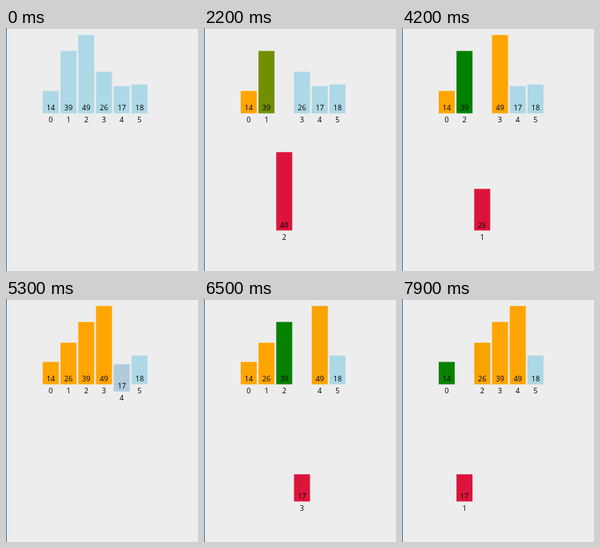
Write an HTML page with a canvas that moves like this. It is 240x304 px and loops after 8 s.

```html
<!DOCTYPE html>
<html lang="en">
<head>
<meta charset="utf-8">
<title>Insertion sort</title>
<style>
  html, body { margin: 0; width: 100%; height: 100%; overflow: hidden; background: #ededed; }
  canvas { display: block; }
</style>
</head>
<body>
<canvas id="stage" width="240" height="304"></canvas>
<script>
const ctx = document.getElementById('stage').getContext('2d');

const LOOP = 8000, TICK = 100;
const FIRST = 310, STEP = 352, MOVE = 250;
const LEFT = 45.9, PITCH = 22.2, BAR = 20, BASE = 106.7, UNIT = 2, DROP = 146.6;

const IDLE = [173, 216, 230];
const SORTED = [255, 165, 0];
const ACTIVE = [220, 20, 60];
const COMPARE = [0, 128, 0];

// Run the sort once and keep a snapshot of every bar after each step.
function recordSteps(values) {
  const bars = values.map((value, slot) => ({ value, slot, down: 0, color: IDLE }));
  const order = bars.slice();
  const steps = [];
  const snap = () => steps.push(bars.map(b => ({ ...b })));

  snap();
  order[0].color = SORTED;
  snap();
  for (let i = 1; i < order.length; i++) {
    const key = order[i];
    key.color = ACTIVE;
    key.down = 1;
    snap();
    for (let j = i - 1; j >= 0; j--) {
      const other = order[j];
      other.color = COMPARE;
      snap();
      if (other.value <= key.value) {
        other.color = SORTED;
        break;
      }
      order[j] = key;
      order[j + 1] = other;
      key.slot = j;
      other.slot = j + 1;
      snap();
      other.color = SORTED;
    }
    key.color = SORTED;
    key.down = 0;
    snap();
  }
  return steps;
}

const steps = recordSteps([14, 39, 49, 26, 17, 18]);

const ease = p => p < 0.5 ? 4 * p ** 3 : 1 - 4 * (1 - p) ** 3;
const mix = (a, b, p) => a + (b - a) * p;

function drawBar(from, to, p) {
  const x = LEFT + PITCH * mix(from.slot, to.slot, p);
  const y = BASE + DROP * mix(from.down, to.down, p);
  const h = to.value * UNIT;
  const rgb = from.color.map((c, i) => Math.round(mix(c, to.color[i], p)));

  ctx.fillStyle = `rgb(${rgb})`;
  ctx.fillRect(x, y - h, BAR, h);
  ctx.fillStyle = '#000';
  ctx.fillText(to.value, x + BAR / 2, y - 3.4);
  ctx.fillText(to.slot, x + BAR / 2, y + 11.6);
}

function draw(t) {
  ctx.fillStyle = '#ededed';
  ctx.fillRect(0, 0, 240, 304);
  ctx.fillStyle = '#c3c9cf';
  ctx.fillRect(0, 0, 240, 1);
  ctx.fillStyle = '#3f78a8';
  ctx.fillRect(0, 0, 1, 304);

  ctx.font = '9.2px "Open Sans", "Noto Sans", sans-serif';
  ctx.textAlign = 'center';

  const n = Math.min(steps.length - 1, Math.max(0, Math.floor((t - FIRST) / STEP) + 1));
  const start = FIRST + (n - 1) * STEP;
  const p = n ? ease(Math.min(1, (t - start) / MOVE)) : 1;
  const prev = steps[Math.max(0, n - 1)];
  steps[n].forEach((bar, i) => drawBar(prev[i], bar, p));
}

let begin;
function frame(now) {
  begin ??= now;
  // The motion advances in ticks; the small lead absorbs timer jitter.
  const t = Math.floor((now - begin + 20) / TICK) * TICK;
  draw(t % LOOP);
  requestAnimationFrame(frame);
}
draw(0);
requestAnimationFrame(frame);
</script>
</body>
</html>
```
